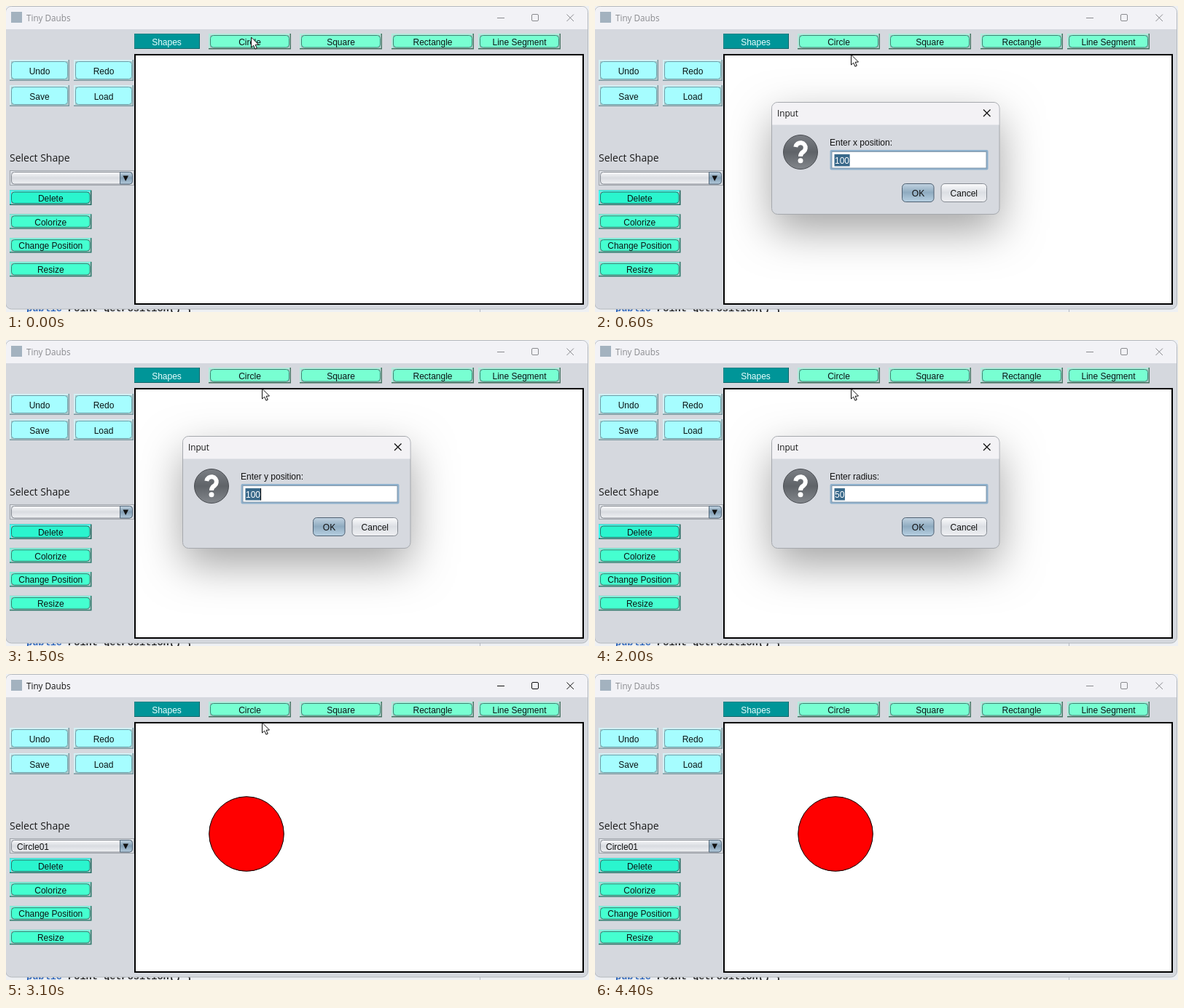
Animation, 800 px wide and 421 px high, one loop 4500 ms. Source, as an HTML page with a canvas:

```html
<!DOCTYPE html>
<html lang="en">
<head>
<meta charset="utf-8">
<title>Tiny Daubs</title>
<style>
html, body { margin: 0; width: 100%; height: 100%; overflow: hidden; background: #eef0f3; }
canvas { display: block; width: 800px; height: 421px; }
</style>
</head>
<body>
<canvas id="stage" width="800" height="421"></canvas>
<script>
const W = 800, H = 421, LOOP = 4500, STEP = 100;
const UI = '"Liberation Sans", Arial, sans-serif';
const SYS = '"Open Sans", "Noto Sans", sans-serif';
const MONO = '13.6px "Liberation Mono", "Courier New", monospace';
const ctx = document.getElementById('stage').getContext('2d');
const layer = document.createElement('canvas');
layer.width = W;
layer.height = H;
const dlg = layer.getContext('2d');

const PROMPTS = [
  { label: 'Enter x position:', value: '100', open: 300, close: 1000 },
  { label: 'Enter y position:', value: '100', open: 1100, close: 1700 },
  { label: 'Enter radius:', value: '50', open: 1800, close: 2400 }
];
const DRAWN_AT = 2400;

// Button colours: face, outline, lit edge, shaded edge
const AQUA = ['#a6fdff', '#6a9fa8', '#d2f0f4', '#76949c'];
const MINT = ['#78ffd2', '#3c8673', '#b0ecdc', '#44705f'];
const GREEN = ['#45ffd0', '#2b8570', '#84f3df', '#2f786a'];
const FOCUS = ['#2af5ce', '#1c7a6c', '#3dfff0', '#23665c'];

function rect(c, x, y, w, h, fill) {
  c.fillStyle = fill;
  c.fillRect(x, y, w, h);
}

function round(c, x, y, w, h, r, fill, stroke) {
  c.beginPath();
  c.roundRect(x, y, w, h, r);
  if (fill) { c.fillStyle = fill; c.fill(); }
  if (stroke) { c.strokeStyle = stroke; c.stroke(); }
}

function text(c, str, x, y, color = '#111', font = '12px ' + UI, align = 'left') {
  c.font = font;
  c.textAlign = align;
  c.fillStyle = color;
  c.fillText(str, x, y);
}

function line(c, color, ...pts) {
  c.strokeStyle = color;
  c.beginPath();
  for (let i = 0; i < pts.length; i += 2) c.lineTo(pts[i], pts[i + 1]);
  c.stroke();
}

function shade(c, y, h, ...colors) {
  const g = c.createLinearGradient(0, y, 0, y + h);
  colors.forEach((col, i) => g.addColorStop(i / (colors.length - 1), col));
  return g;
}

function cross(c, x, y, s, color) {
  line(c, color, x, y, x + s, y + s);
  line(c, color, x + s, y, x, y + s);
}

// Raised bevel around a rounded inner button
function button(label, x, y, w, h, [face, outline, light, dark]) {
  rect(ctx, x, y, w, h, dark);
  rect(ctx, x, y, w - 1.5, h - 1.5, light);
  rect(ctx, x + 2, y + 2, w - 3.5, h - 3.5, '#b3c8ca');
  round(ctx, x + 2.5, y + 2.5, w - 5, h - 5, 4, face, outline);
  text(ctx, label, x + w / 2, Math.round(y + h / 2 + 5), '#0a1414', undefined, 'center');
}

function backdrop() {
  rect(ctx, 0, 0, W, H, '#eef0f3');
  line(ctx, '#b8bcc2', 650.5, 0, 650.5, H);
  text(ctx, 'public', 28, 419.5, '#2a62b8', 'bold ' + MONO);
  text(ctx, 'Point getPosition() {', 85.1, 419.5, '#222', 'bold ' + MONO);
}

function frame(active) {
  const ink = active ? '#111' : '#8a8b8f';
  round(ctx, -0.5, 0.5, 799, 416.5, 8, '#d5d8de', '#b4b8bd');
  round(ctx, 0, 1, 798, 31, [7, 7, 0, 0], '#f2f2f6');
  rect(ctx, 7, 8, 15, 15, '#a3b2bf');
  text(ctx, 'Tiny Daubs', 28, 21, ink, '11.7px ' + SYS);
  line(ctx, ink, 674, 16.5, 684, 16.5);
  round(ctx, 721.5, 11.5, 9, 9, 1.5, null, ink);
  cross(ctx, 769.5, 11.5, 9.5, ink);
}

function toolbar() {
  rect(ctx, 176, 38, 90, 21, '#0a6468');
  rect(ctx, 176, 38, 89, 20, '#168387');
  rect(ctx, 177, 39, 88, 19, '#009598');
  text(ctx, 'Shapes', 220.5, 54, '#e8ffff', undefined, 'center');

  const shapes = [['Circle', 278], ['Square', 403], ['Rectangle', 529], ['Line Segment', 648]];
  for (const [label, x] of shapes) button(label, x, 38, 113, 21.5, MINT);
}

function sidebar(hasShape) {
  const files = [['Undo', 5, 74], ['Redo', 93, 74], ['Save', 5, 109], ['Load', 93, 109]];
  for (const [label, x, y] of files) button(label, x, y, 82, 29, AQUA);

  text(ctx, 'Select Shape', 5, 214, '#1a1a1a', '14px ' + SYS);
  rect(ctx, 5, 226, 171, 21, '#9fa4aa');
  rect(ctx, 6, 227, 169, 19, '#dfe2e7');
  round(ctx, 7.5, 228.5, 166, 16.5, 4, shade(ctx, 228, 17, '#fbfbfc', '#d9dce1', '#eff0f3'), '#81868e');
  round(ctx, 156.5, 228.5, 17, 16.5, [0, 4, 4, 0], shade(ctx, 228, 17, '#c5d6e3', '#829eb4', '#b3cadb'), '#56697a');
  ctx.fillStyle = '#111';
  ctx.beginPath();
  ctx.moveTo(160.5, 233.5);
  ctx.lineTo(168, 233.5);
  ctx.lineTo(164.2, 241);
  ctx.fill();
  if (hasShape) text(ctx, 'Circle01', 15, 241.5);

  ['Delete', 'Colorize', 'Change Position', 'Resize'].forEach((label, i) =>
    button(label, 5, 253.5 + i * 32.8, 112.5, 20.5, i ? GREEN : FOCUS));
}

function paper(hasShape) {
  rect(ctx, 176, 66, 617, 345, '#000');
  rect(ctx, 178, 68, 613, 341, '#fff');
  if (!hasShape) return;
  ctx.beginPath();
  ctx.arc(330, 220, 51.3, 0, Math.PI * 2);
  ctx.fillStyle = '#f00';
  ctx.fill();
  ctx.strokeStyle = '#000';
  ctx.stroke();
}

function questionIcon(c) {
  c.beginPath();
  c.arc(282, 201, 23.5, 0, Math.PI * 2);
  c.fillStyle = shade(c, 177, 48, '#7b7f85', '#5f6368', '#84888d');
  c.fill();
  c.strokeStyle = '#4b4e53';
  c.stroke();
  c.save();
  c.lineWidth = 6;
  c.strokeStyle = c.fillStyle = '#fff';
  c.beginPath();
  c.arc(282, 195, 6.8, Math.PI * 1.05, Math.PI * 0.28);
  c.quadraticCurveTo(282, 202.5, 282, 207);
  c.stroke();
  c.beginPath();
  c.arc(282, 212.7, 3.5, 0, Math.PI * 2);
  c.fill();
  c.restore();
}

function prompt(c, p, caret, pressed) {
  c.clearRect(0, 0, W, H);
  c.save();
  c.shadowColor = 'rgba(0,0,0,.36)';
  c.shadowBlur = 58;
  c.shadowOffsetY = 22;
  round(c, 243, 132.5, 312, 154, 8, '#d6d9df');
  c.restore();
  round(c, 242.5, 132.5, 312.5, 154, 8, '#d6d9df', '#a5a8ad');
  round(c, 243, 133, 311.5, 30.5, [7.5, 7.5, 0, 0], '#f3f2f5');
  text(c, 'Input', 250, 152, '#151515', '11.7px ' + SYS);
  c.lineWidth = 1.3;
  cross(c, 533, 142.5, 9.5, '#111');
  c.lineWidth = 1;
  questionIcon(c);
  text(c, p.label, 322, 191.5);

  round(c, 322.5, 198, 217, 27.5, 2, '#8fb1cd');
  rect(c, 324.5, 200, 213, 23.5, '#8499ab');
  rect(c, 325.5, 201, 211, 21.5, '#fff');
  const w = p.value.length * 6.7;
  rect(c, 328.5, 204, w + 1, 16.5, '#39698a');
  text(c, p.value, 329, 217, '#fff');
  if (caret) rect(c, 329 + w, 204, 1, 16.5, '#000');

  const blue = pressed ? ['#5d7f99', '#4d718d', '#6b8ca5'] : ['#c3d4e2', '#8fabc0', '#b6cfe1'];
  round(c, 421.5, 244.5, 43.5, 25, 5, shade(c, 244, 25, ...blue), '#4d5f70');
  text(c, 'OK', 443.5, 262, pressed ? '#fff' : '#111', undefined, 'center');
  round(c, 475, 244.5, 62.5, 25, 5, shade(c, 244, 25, '#fdfdfe', '#dcdfe4', '#eeeff2'), '#858a92');
  text(c, 'Cancel', 506.3, 262, '#111', undefined, 'center');
}

function prompts(t) {
  for (const p of PROMPTS) {
    const age = t - p.open, closing = t >= p.close;
    if (age < 0 || t >= p.close + STEP) continue;
    const opening = age < STEP;
    const scale = closing ? 0.977 : opening ? 0.96 : 1;
    prompt(dlg, p, age >= 400 && age < 800, closing);
    ctx.save();
    ctx.globalAlpha = closing || opening ? 0.5 : 1;
    ctx.translate(399, 209.5);
    if (closing) ctx.translate(-2, -1);
    ctx.scale(scale, scale);
    ctx.drawImage(layer, -399, -209.5);
    ctx.restore();
  }
}

function ease(t, from, to) {
  const k = Math.min(1, Math.max(0, (t - from) / (to - from)));
  return k * k * (3 - 2 * k);
}

function cursor(t) {
  if (t >= 4200) return;
  const a = ease(t, 200, 500), b = ease(t, 3900, 4150);
  ctx.save();
  ctx.translate(336.5 + 15 * a + 28 * b, 43 + 24 * a - 66 * b);
  ctx.beginPath();
  ctx.moveTo(0, 0);
  for (const [x, y] of [[0, 14], [3.2, 11.2], [5.4, 16.2], [7.8, 15.2], [5.6, 10.3], [10, 10]]) ctx.lineTo(x, y);
  ctx.closePath();
  ctx.fillStyle = '#fff';
  ctx.fill();
  ctx.strokeStyle = '#111';
  ctx.stroke();
  ctx.restore();
}

function draw(t) {
  const hasShape = t >= DRAWN_AT;
  const active = t === 200 || (hasShape && t < 4300);
  backdrop();
  frame(active);
  toolbar();
  sidebar(hasShape);
  paper(hasShape);
  prompts(t);
  cursor(t);
}

let shown = -1;
const start = performance.now();
function tick() {
  const t = Math.floor(((performance.now() - start) % LOOP) / STEP) * STEP;
  if (t !== shown) draw(shown = t);
  requestAnimationFrame(tick);
}
tick();
</script>
</body>
</html>
```
